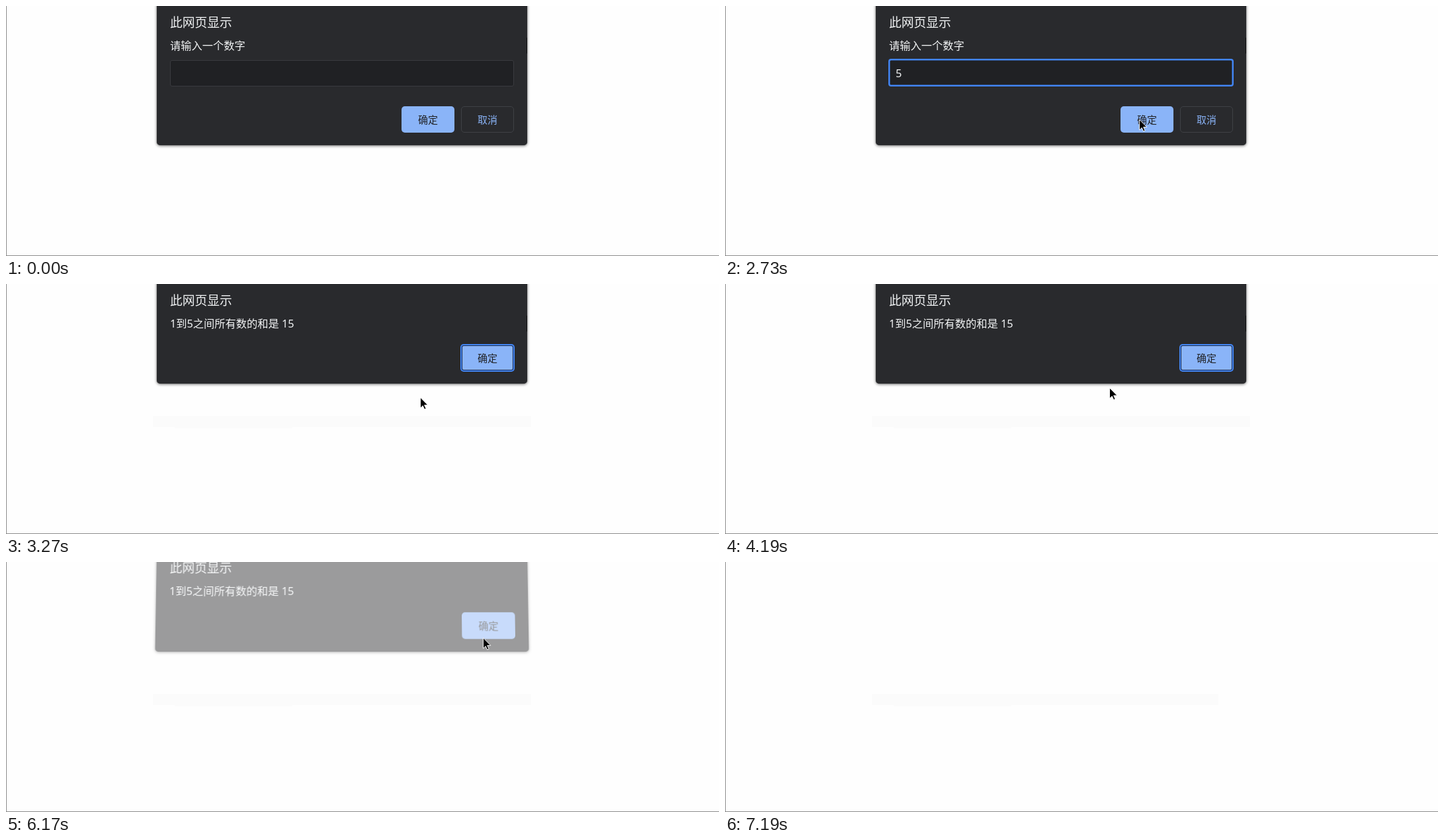
Write an HTML page that moves like this. It is 1078x379 px and loops after 7330 ms.

```html
<!DOCTYPE html>
<html lang="zh-CN">
<head>
<meta charset="utf-8">
<style>
html, body { margin: 0; width: 100%; height: 100%; overflow: hidden; background: #fefefe; }
body { position: relative; font-family: "Noto Sans", "Noto Sans CJK SC", "Noto Sans CJK", sans-serif; }
div { position: absolute; box-sizing: border-box; white-space: nowrap; }
#stage { left: 0; top: 0; width: 1078px; height: 379px; overflow: hidden;
  border-left: 1px solid #8c8c8c; border-bottom: 1px solid #8c8c8c; }
#layer { left: -1px; top: 0; width: 1078px; height: 378px; }
.band { background: #fbfbfb; }
/* dialogs start above the stage; y inside a dialog is stage y + 40 */
.dialog { left: 228px; top: -40px; width: 560px; background: #292a2d; border-radius: 0 0 5px 5px;
  box-shadow: 0 1px 4px rgba(0,0,0,.6), 0 0 1px rgba(0,0,0,.6); transform-origin: 280px 40px; }
#prompt { height: 251px; }
#alert { height: 191px; }
.title, .text { left: 20px; color: #f1f3f4; }
.title { top: 53px; font-size: 18.75px; line-height: 24px; }
.text { top: 89px; font-size: 16.25px; line-height: 22px; }
.notch { left: 559px; top: 88px; width: 1px; height: 24px; background: #0c0c0d; }
.field { left: 20px; top: 122px; width: 520px; height: 40px; background: #202124;
  border: 1px solid #3a3b3f; border-radius: 3px; }
.ring { left: 19px; top: 120px; width: 522px; height: 42px; background: #202124;
  border-radius: 4px; box-shadow: inset 0 0 0 2.5px #4285f4; }
.digit { left: 30px; top: 131px; color: #f1f3f4; font-size: 16.25px; line-height: 22px; }
.caret { top: 132px; width: 1px; height: 20px; background: #e8eaed; }
.button { width: 80px; height: 40px; line-height: 40px; font-size: 15px; text-align: center;
  border-radius: 5px; background: #8ab4f8; color: #202124; }
.cancel { background: none; color: #8ab4f8; border: 1px solid #3f4145; line-height: 38px; }
.focus { margin: 2px; width: 76px; height: 36px; line-height: 36px; border-radius: 2px;
  box-shadow: 0 0 0 1px #1c2c4c, 0 0 0 3px #4285f4; }
svg { position: absolute; left: 0; top: 0; overflow: visible; }
</style>
</head>
<body>
<div id="stage"><div id="layer">
  <div id="bands">
    <div class="band" id="band" style="left:222px;top:200px;height:17px"></div>
    <div class="band" style="left:255px;top:217px;width:178px;height:2px;opacity:.6"></div>
  </div>
  <div class="dialog" id="prompt">
    <div class="title">此网页显示</div>
    <div class="text">请输入一个数字</div>
    <div class="notch"></div>
    <div class="field"></div>
    <div class="ring" id="ring"></div>
    <div class="digit" id="digit">5</div>
    <div class="caret" id="caret"></div>
    <div class="button" style="left:370px;top:192px">确定</div>
    <div class="button cancel" style="left:460px;top:192px">取消</div>
  </div>
  <div class="dialog" id="alert">
    <div class="title">此网页显示</div>
    <div class="text">1到5之间所有数的和是 15</div>
    <div class="notch"></div>
    <div class="button" id="ok" style="left:460px;top:132px">确定</div>
  </div>
  <svg width="1" height="1">
    <g id="arrow"><path d="M0 0V16L3.7 12.6L6.2 18L8.6 17L6.1 11.6H11.3Z" fill="#000" stroke="#fff" stroke-width=".9"/></g>
    <g id="beam" fill="none" stroke-linecap="square">
      <path d="M-4 -8H4M-4 8H4M0 -8V8" stroke="#d0d0d0" stroke-width="3"/>
      <path d="M-4 -8H4M-4 8H4M0 -8V8" stroke="#303134" stroke-width="1.2"/>
    </g>
  </svg>
</div></div>
<script>
const LOOP = 7330;
const $ = id => document.getElementById(id);

// pointer: time, kind, x, y
const pointer = [
  [0, ''],
  [580, 'arrow', 419, 200], [720, 'arrow', 410, 184], [865, 'arrow', 388, 150],
  [1005, 'beam', 360, 116], [1150, 'beam', 338, 104], [1290, 'beam', 333, 101],
  [2010, 'beam', 336, 103], [2155, 'beam', 362, 111], [2300, 'arrow', 430, 128],
  [2440, 'arrow', 520, 148], [2585, 'arrow', 598, 166], [2730, 'arrow', 626.5, 172],
  [3890, 'arrow', 620, 171], [4040, 'arrow', 603, 166], [4190, 'arrow', 581.5, 157.5],
  [4310, 'arrow', 530, 126], [4450, 'arrow', 470, 88], [4590, 'arrow', 430, 64],
  [4730, 'arrow', 414, 59], [4870, 'arrow', 418, 57],
  [5020, 'arrow', 452, 62], [5160, 'arrow', 535, 80], [5290, 'arrow', 618.5, 100.5],
  [5440, 'arrow', 680, 110], [5590, 'arrow', 714, 114], [5740, 'arrow', 721.5, 115],
  [6600, 'arrow', 736, 142], [6750, 'arrow', 785, 202], [6900, 'arrow', 890, 284],
  [7040, 'arrow', 1027, 361], [7190, '']
];

// dialogs: time, opacity, tilt in degrees, shift in px
const promptPose = [[0, 1, 0, 0], [3010, .75, 1.8, -7], [3150, .3, 4.3, -18.6], [3270, 0, 0, 0]];
const alertPose = [
  [0, 0, 0, 0], [3010, .2, 3.4, -16], [3150, .88, 1.4, -6.5], [3270, 1, 0, 0],
  [6020, .85, 1.2, -5], [6170, .47, 3.4, -16], [6290, 0, 0, 0]
];

// caret: time, x inside the dialog (0 = hidden)
const caretSteps = [[0, 0], [150, 30], [720, 0], [1290, 30], [1720, 0], [1865, 40], [2440, 0]];

const stepAt = (table, t) => table.findLast(row => row[0] <= t);
const show = (el, on) => { el.style.visibility = on ? 'inherit' : 'hidden'; };

function pose(el, table, t) {
  const [, opacity, tilt, shift] = stepAt(table, t);
  el.style.visibility = opacity ? 'visible' : 'hidden';
  el.style.opacity = opacity;
  el.style.transform = tilt ? `perspective(1000px) translateY(${shift}px) rotateX(${tilt}deg)` : 'none';
  show(el.querySelector('.notch'), !tilt);
}

function draw(t) {
  pose($('prompt'), promptPose, t);
  pose($('alert'), alertPose, t);
  show($('ring'), t >= 150 && t < 2880);
  show($('digit'), t >= 1865);
  $('ok').classList.toggle('focus', t < 6020);

  const caretX = stepAt(caretSteps, t)[1];
  show($('caret'), caretX);
  $('caret').style.left = caretX + 'px';

  show($('bands'), t >= 3010);
  $('band').style.width = (t < 6750 ? 572 : 524) + 'px';

  const [, kind, x, y] = stepAt(pointer, t);
  for (const id of ['arrow', 'beam']) {
    show($(id), id === kind);
    if (id === kind) $(id).setAttribute('transform', `translate(${x} ${y})`);
  }
}

const start = performance.now();
function tick() {
  draw((performance.now() - start) % LOOP);
  requestAnimationFrame(tick);
}
tick();
</script>
</body>
</html>
```
